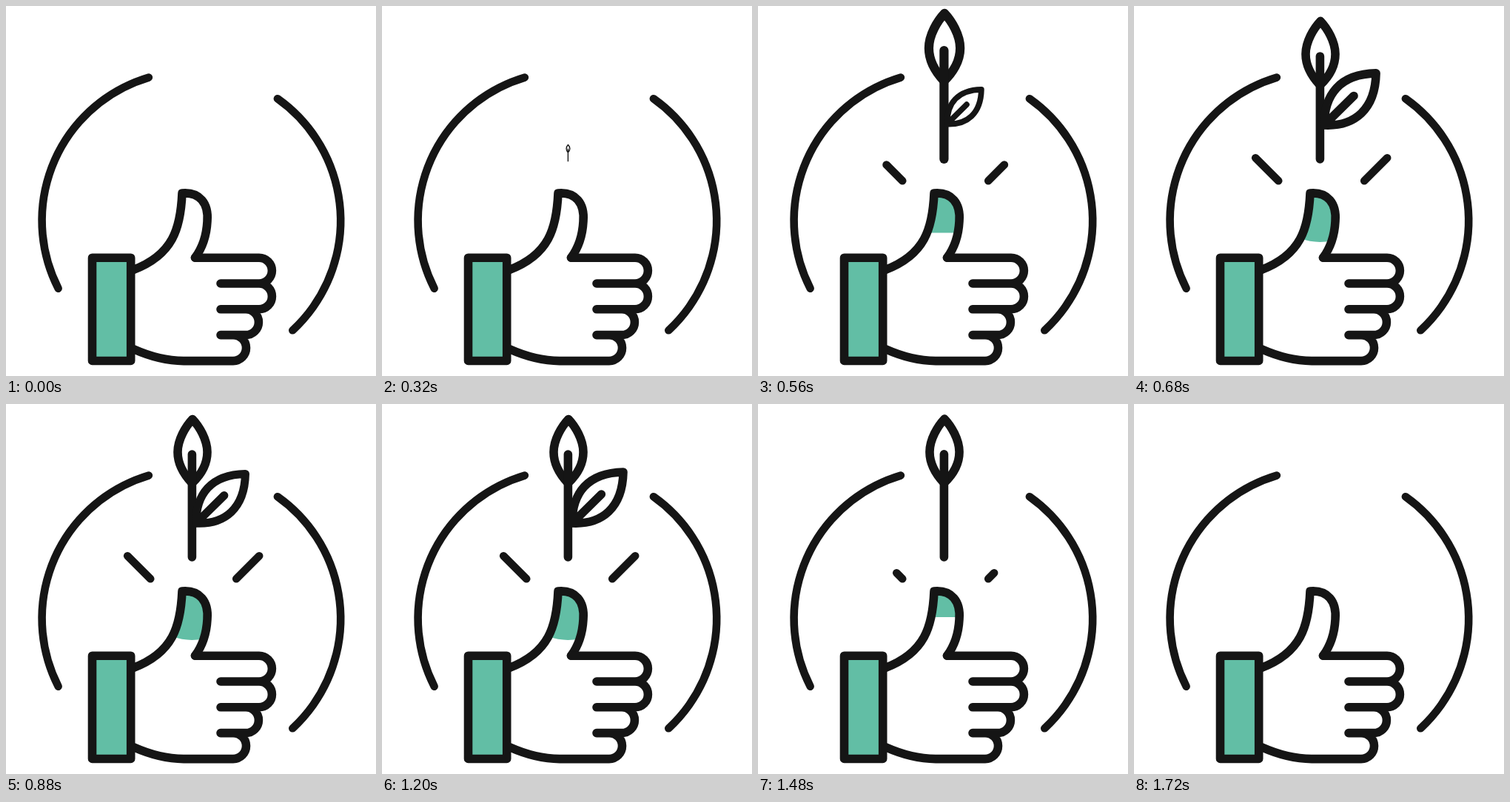
Animation of 500x500 px, one loop 2000 ms. Source, as an HTML page with a canvas:

```html
<!DOCTYPE html>
<html lang="en">
<head>
<meta charset="utf-8">
<title>Green thumb</title>
<style>
  html, body { margin: 0; width: 100%; height: 100%; overflow: hidden; background: #fff; }
  canvas { display: block; width: 100vw; height: 100vh; }
</style>
</head>
<body>
<canvas id="stage" width="500" height="500"></canvas>
<script>
const canvas = document.getElementById('stage');
const ctx = canvas.getContext('2d');
const INK = '#151515', GREEN = '#62bea5';
const THICK = 11.6, THIN = 10.6;
const LOOP = 2000;

const cuff = new Path2D('M116.5 340.2H168.7V479.5H116.5Z');
const thumb = new Path2D('M172 356.5C226 336 236 300 238 253C262 251 274 267 272 291C271 310 266 326 255.5 340.2');
const thumbFill = new Path2D('M238 253C262 251 274 267 272 291C271 302 269 310 267 317Q247 322 224 314C234 297 237 277 238 253Z');
const fingers = new Path2D('M255.5 340.2H342a17.4 17.4 0 0 1 0 34.8H290M342 375a17.4 17.4 0 0 1 0 34.8H290' +
  'M324 409.8a17.4 17.4 0 0 1 0 34.8H290M307 444.6a17.5 17.5 0 0 1 0 35H240Q208 479.5 172 463.5');
const topLeaf = new Path2D('M252 20.5C243 30 232 48 232 65C232 82 242 97 251.4 107C262 97 272 82 272 65C272 48 261 30 252 20.5Z');
const stem = new Path2D('M251.4 68V207');
const sideLeaf = new Path2D('M257 161C257 120 278 92 327 91C326 140 298 163 257 161ZM297 121.5L257 161');

const clamp = x => Math.min(1, Math.max(0, x));
const span = (t, from, length) => clamp((t - from) / length);
const sine = x => (1 - Math.cos(Math.PI * x)) / 2;
const backIn = (x, s) => x * x * ((s + 1) * x - s);
const backOut = (x, s) => 1 - backIn(1 - x, s);

// Cubic curve (.25, .1, .25, 1), solved for x by bisection
function ease(x) {
  const bez = (a, b, u) => 3 * a * u * (1 - u) ** 2 + 3 * b * u * u * (1 - u) + u ** 3;
  let lo = 0, hi = 1;
  for (let i = 0; i < 20; i++) {
    const mid = (lo + hi) / 2;
    if (bez(.25, .25, mid) < x) lo = mid; else hi = mid;
  }
  return bez(.1, 1, lo);
}

function pose(t) {
  if (t < 1000) return {
    plant: backOut(span(t, 310, 378), 1.25),
    leaf: backOut(span(t, 480, 420), 1.5),
    rays: sine(span(t, 350, 335)),
    fill: sine(span(t, 300, 365))
  };
  return {
    plant: 1 - backIn(span(t, 1340, 255), 1.25),
    leaf: 1 - backIn(span(t, 1055, 390), 1.05),
    rays: t < 1720 ? 1 - ease(span(t, 1262, 490)) : 0,
    fill: 1 - sine(span(t, 1308, 372))
  };
}

function stroke(path, width) {
  ctx.lineWidth = width;
  ctx.stroke(path);
}

function line(x1, y1, x2, y2) {
  ctx.lineWidth = THIN;
  ctx.beginPath();
  ctx.moveTo(x1, y1);
  ctx.lineTo(x2, y2);
  ctx.stroke();
}

function arc(x1, y1, x2, y2) {
  const cx = 250.4, cy = 290;
  ctx.lineWidth = THIN;
  ctx.beginPath();
  ctx.arc(cx, cy, 201.8, Math.atan2(y1 - cy, x1 - cx), Math.atan2(y2 - cy, x2 - cx));
  ctx.stroke();
}

function scaled(x, y, k, draw) {
  if (k <= 0.001) return;
  ctx.save();
  ctx.translate(x, y);
  ctx.scale(k, k);
  ctx.translate(-x, -y);
  draw();
  ctx.restore();
}

function drawPlant(p) {
  scaled(251.4, 210, p.plant, () => {
    stroke(topLeaf, THICK);
    stroke(stem, THICK);
    scaled(252, 164, p.leaf / 1.053, () => stroke(sideLeaf, THICK));
  });
}

function drawHand(p) {
  ctx.fillStyle = GREEN;
  ctx.fill(cuff);
  ctx.save();
  ctx.beginPath();
  ctx.rect(215, 240, 70, 8 + 72 * p.fill);
  ctx.clip();
  ctx.fill(thumbFill);
  ctx.restore();
  stroke(thumb, THICK);
  stroke(fingers, THICK);
  stroke(cuff, THICK);
}

function draw(t) {
  const ratio = window.devicePixelRatio || 1;
  const w = Math.round(innerWidth * ratio), h = Math.round(innerHeight * ratio);
  if (canvas.width !== w || canvas.height !== h) {
    canvas.width = w;
    canvas.height = h;
  }
  ctx.setTransform(w / 500, 0, 0, h / 500, 0, 0);
  ctx.fillStyle = '#fff';
  ctx.fillRect(0, 0, 500, 500);
  ctx.strokeStyle = INK;
  ctx.lineCap = ctx.lineJoin = 'round';

  const p = pose(t);
  arc(71, 381.5, 193, 97);
  arc(367, 125, 387, 438);
  drawPlant(p);
  if (p.rays > 0.001) {
    const d = 31 * p.rays;
    line(195.2, 236.2, 195.2 - d, 236.2 - d);
    line(311.2, 236.2, 311.2 + d, 236.2 - d);
  }
  drawHand(p);
}

const start = performance.now();
function tick() {
  draw((performance.now() - start) % LOOP);
  requestAnimationFrame(tick);
}
tick();
</script>
</body>
</html>
```
